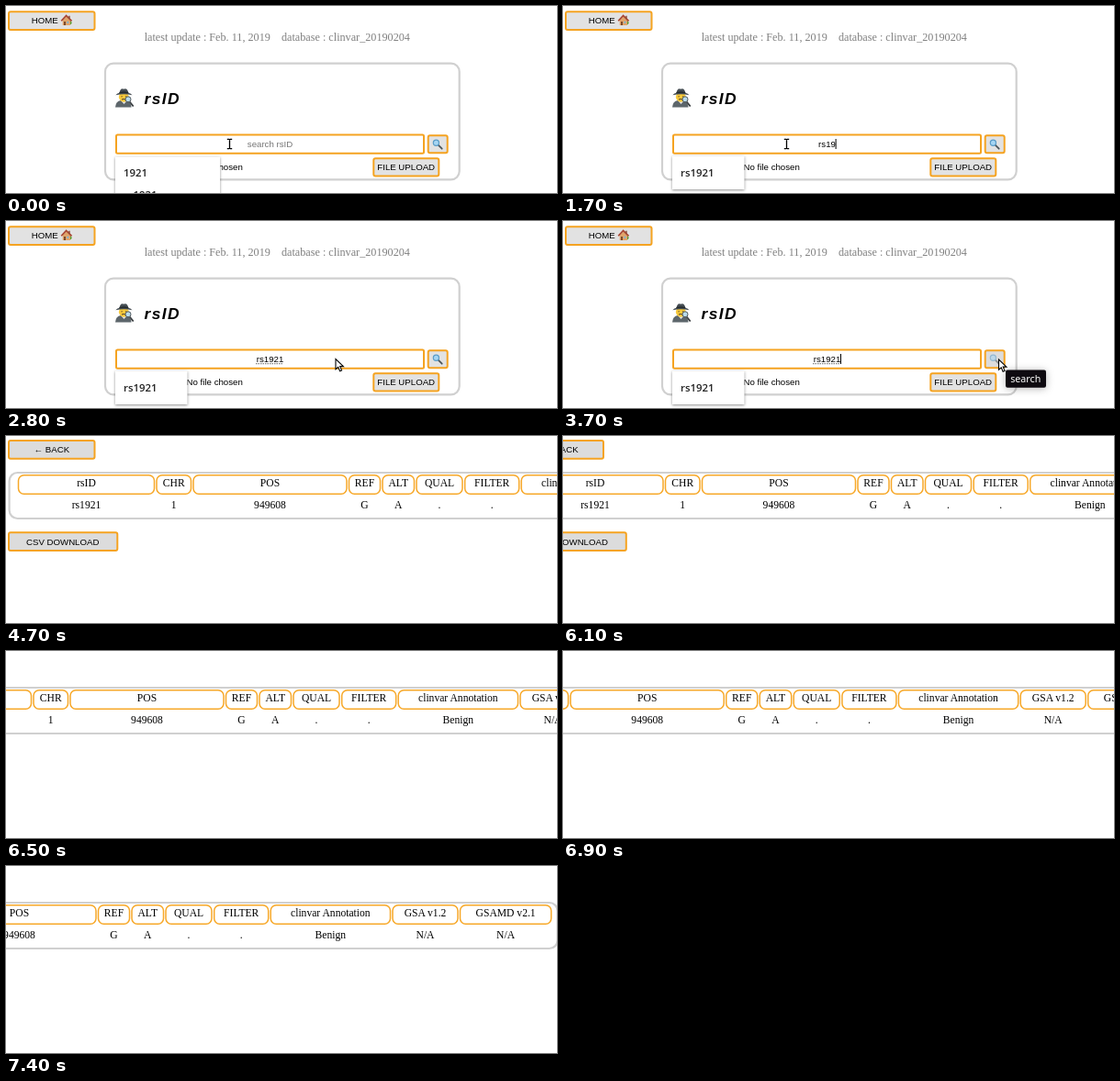
Recreate the animation shown at these times as an HTML page. Size 600 by 204 pixels, loop 9.7 s.

```html
<!DOCTYPE html>
<html lang="en">
<head>
<meta charset="utf-8">
<title>rsID search</title>
<style>
  html, body { margin: 0; width: 100%; height: 100%; overflow: hidden; background: #fff; }
  svg { display: block; width: 600px; height: 204px; }
  text { white-space: pre; }
  .ui { font: 9.67px "Liberation Sans", Arial, sans-serif; }
  .serif { font: 11.6px "Liberation Serif", "Times New Roman", serif; }
  .info { font-size: 12.18px; fill: #808080; }
  .title { font: italic bold 17.4px "Liberation Sans", Arial, sans-serif; letter-spacing: 1.45px; }
  .pop { font: 600 11.4px "Open Sans", "Noto Sans", sans-serif; fill: #222; }
  .tip { font: 500 10.7px "Noto Sans", sans-serif; fill: #fff; }
  .mid { text-anchor: middle; }
  .btn { fill: #e2e2e2; stroke: #f5a321; stroke-width: 2; }
  .results .btn { fill: #dcdcdc; }
  .frame { fill: #fff; stroke: #d0d0d0; stroke-width: 2.2; }
  .cell { fill: #fff; stroke: #f7a828; stroke-width: 1.5; }
  .list { fill: #fff; filter: drop-shadow(0 1px 1.5px rgba(0, 0, 0, .45)); }
  .tipbox { fill: #0e0a10; filter: drop-shadow(0 1px 4px rgba(0, 0, 0, .3)); }
</style>
</head>
<body>
<svg viewBox="0 0 600 204">
  <g id="search">
    <rect class="btn" x="3" y="6.3" width="93.5" height="19.8" rx="2"/>
    <text class="ui" x="27.7" y="19.4">HOME</text>
    <g id="house">
      <circle cx="69.3" cy="18.2" r="2.2" fill="#5c9e31"/>
      <path d="M61.7 15.5 66 11.5 70 15.5V21H61.7Z" fill="#e0a46a"/>
      <path d="M60.2 16.3 65.6 10.4 71.5 16.3" fill="none" stroke="#a8432f" stroke-width="1.7"/>
      <path d="M68.2 10.8h1.5v3h-1.5z" fill="#8a4a35"/>
      <path d="M63 17h2v4h-2z" fill="#7c4a2c"/>
      <path d="M66.3 16.8h2v2h-2z" fill="#7fb7d8"/>
    </g>
    <text class="serif info" x="150.7" y="38">latest update : Feb. 11, 2019&#160;&#160;&#160;&#160;database : clinvar_20190204</text>

    <rect class="frame" x="108" y="62.7" width="385.7" height="126.6" rx="9"/>
    <g id="detective">
      <path d="M119 110.5q.5-7 6-7.5h6q5 1 5.5 7.5z" fill="#5d666b"/>
      <path d="m125 103 3.5 4 3.5-4z" fill="#e8e8e8"/>
      <circle cx="128.3" cy="99.3" r="5.4" fill="#f7c93b"/>
      <path d="M125.5 98.8h1.2m3.4 0h1.2M126 102q2.2-1 4.2 0" stroke="#4a3a2a" stroke-width="1" fill="none"/>
      <path d="M119.3 97.3q2-2.2 4.2-2.5.8-4.6 3.2-4.6 1.6.8 3.2 0 2.6 0 3.3 4.6 2.4.3 4.3 2.5-9-2.3-18.2 0z" fill="#454d52"/>
      <path d="M123.4 94.6q5-1.2 9.9 0" stroke="#252b2e" stroke-width="1.3" fill="none"/>
      <path d="m134.7 104.5 4 5" stroke="#383d40" stroke-width="1.8"/>
      <circle cx="133" cy="101.8" r="3" fill="#b9dcec" stroke="#50585c"/>
    </g>
    <text class="title" x="150.5" y="107.2">rsID</text>

    <rect x="120" y="140.5" width="335" height="20.3" rx="1.5" fill="#fff" stroke="#f5a321" stroke-width="2"/>
    <text class="ui mid" id="hint" x="287.5" y="153.7" fill="#757575">search rsID</text>
    <text class="ui mid" id="query" x="287.5" y="153.7"></text>
    <path id="spell" d="M272 155.7h30" stroke="#666" stroke-dasharray="1.5 1"/>
    <rect id="caret" y="145" width="1" height="11"/>

    <rect class="btn" id="go" x="459.7" y="141.2" width="21" height="19" rx="2"/>
    <g id="lens">
      <path d="m470.7 151.7 4 4" stroke="#4b5459" stroke-width="1.8" stroke-linecap="round"/>
      <circle cx="468.4" cy="149.2" r="3.1" fill="#a5d5f3" stroke="#5a9cc7" stroke-width="1.2"/>
    </g>

    <text class="ui" x="196.6" y="178.8">No file chosen</text>
    <rect class="btn" x="400.3" y="166.2" width="71" height="19.4" rx="2"/>
    <text class="ui" x="404.3" y="179.2">FILE UPLOAD</text>

    <g id="popAll">
      <rect class="list" x="119" y="164.5" width="114" height="60"/>
      <text class="pop" x="128" y="186">1921</text>
      <text class="pop" x="128" y="210">rs1921</text>
    </g>
    <g id="popOne">
      <rect class="list" x="119" y="163.5" width="78.5" height="36.5"/>
      <text class="pop" x="128" y="186">rs1921</text>
    </g>
  </g>

  <g id="results" class="results">
    <rect class="btn" x="3" y="5" width="93.5" height="19.8" rx="2"/>
    <text class="ui" x="30.5" y="18.4">← BACK</text>
    <rect class="frame" x="3.6" y="40" width="870" height="50" rx="9"/>
    <g id="table"></g>
    <rect class="btn" x="3" y="105.3" width="118.3" height="19.8" rx="2"/>
    <text class="ui" x="22" y="118.7">CSV DOWNLOAD</text>
  </g>

  <g id="tip">
    <rect class="tipbox" x="482" y="162.5" width="44" height="19.3" rx="2"/>
    <text class="tip" x="487.2" y="175.5">search</text>
  </g>
  <path id="beam" d="M240.8 145.4h2l.7.6.7-.6h2M243.5 146v9M240.8 155.6h2l.7-.6.7.6h2" fill="none" stroke="#000" stroke-width="1.3"/>
  <path id="arrow" d="M0 0v11.2l2.7-2.4 1.9 4.5 2-.9-1.9-4.3h3.7z" fill="#fff" stroke="#000" stroke-width="1.1"/>
</svg>
<script>
  const LOOP = 9700;
  const $ = id => document.getElementById(id);
  const show = (id, on) => { $(id).style.display = on ? '' : 'none'; };

  // label, value, left, right
  const columns = [
    ['rsID', 'rs1921', 13.5, 161.5], ['CHR', '1', 164, 201.5], ['POS', '949608', 204, 371],
    ['REF', 'G', 373.5, 407.5], ['ALT', 'A', 410, 444.5], ['QUAL', '.', 447, 497],
    ['FILTER', '.', 499.7, 558.7], ['clinvar Annotation', 'Benign', 561.2, 691.5],
    ['GSA v1.2', 'N/A', 694, 765], ['GSAMD v2.1', 'N/A', 767.5, 866.7]
  ];
  $('table').innerHTML = columns.map(([label, value, left, right]) => {
    const mid = (left + right) / 2;
    return `<rect class="cell" x="${left}" y="42.7" width="${right - left}" height="20.6" rx="6"/>
      <text class="serif mid" x="${mid}" y="55.4">${label}</text>
      <text class="serif mid" x="${mid}" y="78.8">${value}</text>`;
  }).join('');

  const WORD = 'rs1921';
  const WIDTHS = [3.22, 4.84, 5.38, 5.38, 5.38, 5.38];
  const SCROLL = [[5800, 0], [6100, 52.5], [6500, 134], [7400, 273]];
  const MOVE = [[2600, 0], [3000, 1]];

  function track(points, t) {
    if (t <= points[0][0]) return points[0][1];
    for (let i = 1; i < points.length; i++) {
      const [t0, a] = points[i - 1], [t1, b] = points[i];
      if (t <= t1) return a + (b - a) * (t - t0) / (t1 - t0);
    }
    return points[points.length - 1][1];
  }

  function draw(t) {
    const done = t >= 4000;
    show('search', !done);
    show('results', done);

    const typed = t < 1100 ? 0 : Math.min(6, Math.floor((t - 1100) / 200) + 1);
    $('query').textContent = WORD.slice(0, typed);
    show('hint', !typed);
    const width = WIDTHS.slice(0, typed).reduce((a, b) => a + b, 0);
    $('caret').setAttribute('x', 287.2 + width / 2);
    const blink = t < 1100 ? t >= 200 && t < 800 : t < 2700 || (t >= 3300 && t < 3900);
    show('caret', blink);
    show('spell', t >= 2700);
    show('popAll', t < 1400);
    show('popOne', t >= 1400);

    const hover = t >= 3000;
    $('go').style.fill = hover ? '#dcdcdc' : '';
    $('lens').style.opacity = t >= 3700 ? .55 : 1;

    const u = track(MOVE, t);
    show('beam', t < 2700);
    show('arrow', t >= 2700 && t < 4700);
    $('arrow').setAttribute('transform', `translate(${243.5 + 231 * u} ${150 + u})`);
    show('tip', t >= 3200 && t < 4000);
    $('tip').style.opacity = t < 3300 ? .5 : t < 3900 ? 1 : .5;

    $('results').setAttribute('transform', `translate(${-track(SCROLL, t)} 0)`);
  }

  let last = -1;
  function tick() {
    const t = Math.floor(performance.now() % LOOP / 100) * 100;
    if (t !== last) draw(last = t);
    requestAnimationFrame(tick);
  }
  tick();
</script>
</body>
</html>
```
